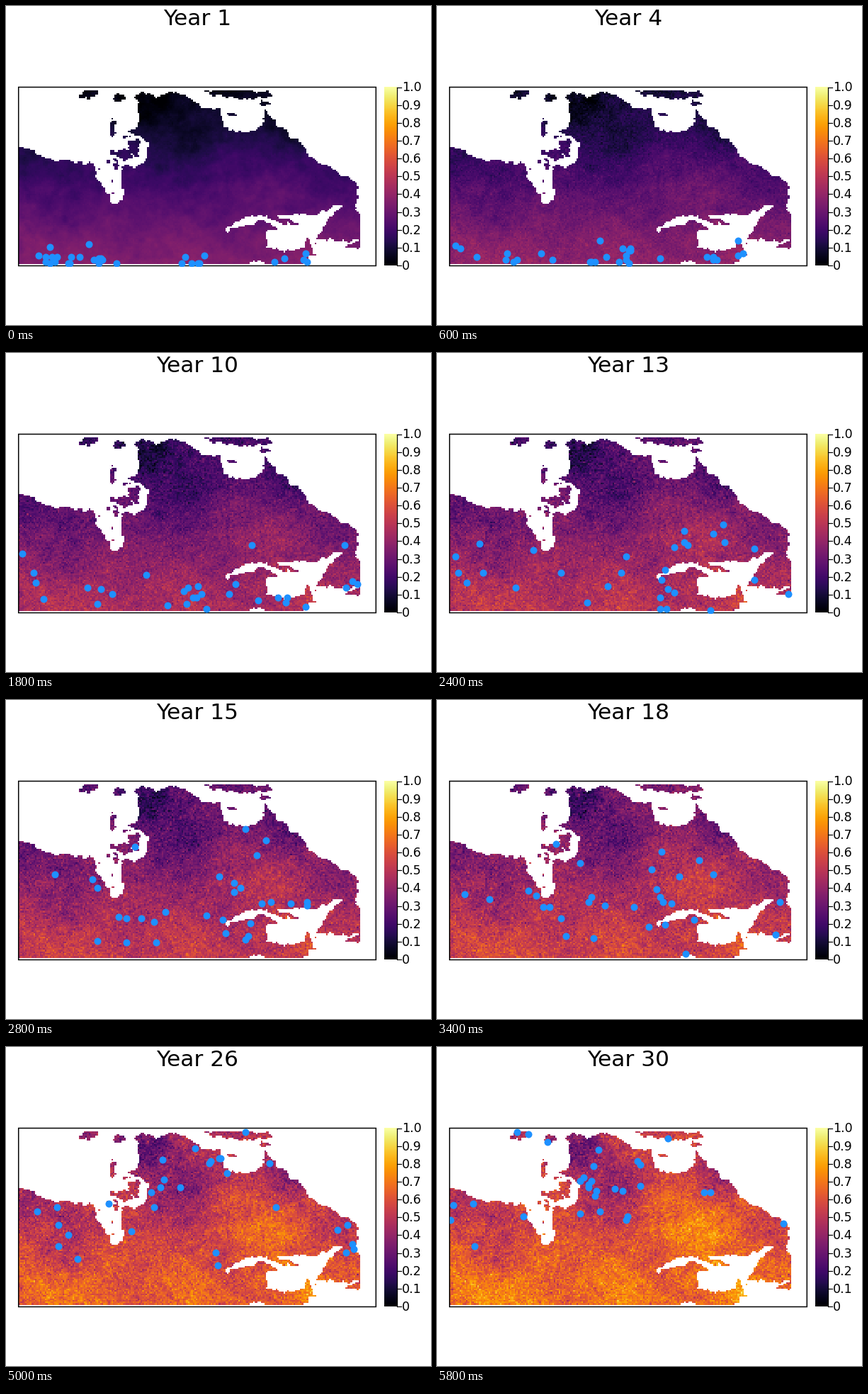
Recreate the animation shown at these times as a matplotlib script. Size 600 by 450 pixels, loop 6 s.

```python
import numpy as np
import matplotlib.pyplot as plt
from matplotlib.animation import FuncAnimation
from matplotlib.patches import Rectangle
from matplotlib.path import Path

W, H, DPI = 600, 450, 100
PX = 72 / DPI
LEFT, RIGHT, TOP, BOTTOM = 17.7, 522.3, 114.5, 366.5
COLS, ROWS, YEARS = 220, 110, 30

plt.rcParams["font.family"] = "DejaVu Sans"

rng = np.random.default_rng(5)
gx, gy = np.meshgrid(LEFT + (np.arange(COLS) + .5) * (RIGHT - LEFT) / COLS,
                     TOP + (np.arange(ROWS) + .5) * (BOTTOM - TOP) / ROWS)


def smooth_noise(sigma):
    """Seeded noise blurred over sigma cells, with unit deviation."""
    fy, fx = np.fft.fftfreq(ROWS)[:, None], np.fft.fftfreq(COLS)
    low = np.exp(-2 * (np.pi * sigma) ** 2 * (fx ** 2 + fy ** 2))
    n = np.fft.ifft2(np.fft.fft2(rng.normal(size=gx.shape)) * low).real
    return n / n.std()


# ---- land: a few key shapes with roughened coasts ----
rx, ry = gx + 1.3 * smooth_noise(1), gy + 1.3 * smooth_noise(1)


def poly(points):
    cells = np.column_stack([rx.ravel(), ry.ravel()])
    return Path(points).contains_points(cells).reshape(gx.shape)


def oval(x, y, a, b, slope=0):
    return ((rx - x) / a) ** 2 + ((ry - y - slope * (rx - x)) / b) ** 2 < 1


coast = [
    (10, 199), (30, 202), (52, 213), (80, 219), (123, 224), (127, 240),
    (137, 258), (150, 278), (160, 278), (167, 264), (163, 248), (164, 228),
    (172, 178), (188, 168), (184, 150), (187, 138), (181, 130), (190, 123),
    (215, 129), (236, 122), (252, 127), (276, 143), (330, 143), (366, 148),
    (384, 170), (415, 194), (424, 213), (470, 236), (493, 250), (496, 270),
    (493, 288), (505, 300), (505, 342), (481, 342), (482, 336), (497, 335),
    (494, 331), (440, 331), (433, 342), (436, 350), (405, 370), (10, 370),
]
gulf = [
    (303, 321), (318, 310), (345, 296), (395, 296), (440, 293), (476, 278),
    (463, 292), (441, 322), (434, 340), (425, 328), (420, 342), (404, 345),
    (388, 345), (368, 340), (367, 318), (384, 315), (362, 304), (340, 309),
]
bays = [(174, 204, 27, 24), (333, 151, 32, 28), (356, 363, 10, 2)]
isles = [
    (115, 124, 14, 6, -.15), (160, 131, 7, 6), (152, 166, 5, 4),
    (150, 176, 4, 7), (166, 211, 11, 8), (181, 200, 8, 10),
    (325, 124, 46, 6, .06), (368, 124, 8, 3), (364, 138, 8, 3),
    (320, 154, 5, 3), (390, 303, 20, 4, .25),
]

land = poly(coast) & ~poly(gulf)
for bay in bays:
    land &= ~oval(*bay)
for isle in isles:
    land |= oval(*isle)
land |= (smooth_noise(.9) > 1.7) & oval(155, 215, 24, 62) & (gx > 128)
land &= (gy > 118) & (gy < 364.5) & (gx < 500)

# ---- suitability: a south-north gradient plus growing warm and cool spots ----
spots = [  # x, y, radius, strength
    (195, 140, 28, -.26), (250, 205, 38, -.17), (85, 260, 38, -.11),
    (392, 187, 27, -.20), (350, 232, 40, .08), (75, 358, 36, .09),
    (385, 280, 38, .08), (430, 348, 20, .10), (318, 310, 24, -.08),
    (285, 350, 30, .07), (482, 258, 25, -.09), (115, 124, 20, -.15),
    (25, 208, 30, -.10),
]
bumps = sum(k * np.exp(-((gx - x) ** 2 + (gy - y) ** 2) / (2 * r * r))
            for x, y, r, k in spots)
south = (gy - TOP) / (BOTTOM - TOP)
texture = .012 * smooth_noise(3) + .007 * smooth_noise(1)
grain = rng.normal(size=gx.shape)


def climate(year):
    s = (year - 1) / (YEARS - 1)
    start, end = .04 + .32 * south, .55 + .12 * south
    return start + (end - start) * s + bumps * (.25 + .75 * s) + texture * (1 + s)


def field(year):
    fresh = np.random.default_rng(year).normal(size=gx.shape)
    level = .004 + .052 * (1 - np.exp(-(year - 1) / 8))
    value = climate(year) + level * (.8 * grain + .6 * fresh)
    return np.ma.array(np.clip(value, 0, 1), mask=~land)


def sightings(year):
    """Thirty land cells, most likely where the climate is near the ideal."""
    band = .03 + .03 * (year - 1) / (YEARS - 1)
    weight = land * np.exp(-.5 * ((climate(year) - .45) / band) ** 2)
    p = weight.ravel() / weight.sum()
    pick = np.random.default_rng(100 + year).choice(p.size, 30, p=p)
    return np.column_stack([gx.ravel()[pick], gy.ravel()[pick]])


# ---- stage ----
fig = plt.figure(figsize=(W / DPI, H / DPI), dpi=DPI, facecolor="white")
ax = fig.add_axes([0, 0, 1, 1])
ax.axis("off")

heat = ax.imshow(field(1), cmap="inferno", vmin=0, vmax=1, aspect="auto",
                 interpolation="nearest", extent=(LEFT, RIGHT, BOTTOM, TOP))
ax.imshow(np.linspace(1, 0, 256)[:, None], cmap="inferno", aspect="auto",
          interpolation="nearest", extent=(534, 551.5, BOTTOM - .5, TOP))
ax.set_xlim(0, W)
ax.set_ylim(H, 0)

box = (LEFT, TOP), RIGHT - LEFT, BOTTOM - TOP
ax.add_patch(Rectangle(*box, fill=False, ec="black", lw=1.5 * PX, snap=False,
                       zorder=3))
dots = ax.scatter([], [], s=(10 * PX) ** 2, c="dodgerblue", linewidths=0, zorder=4)
dots.set_clip_path(Rectangle(*box, transform=ax.transData))

ax.plot([551.5, 551.5], [TOP, BOTTOM - .5], color="black", lw=1.2 * PX)
for k in range(11):
    y = BOTTOM - .5 - k * (BOTTOM - TOP - .5) / 10
    ax.plot([551.5, 557.5], [y, y], color="black", lw=1.2 * PX)
    ax.text(559, y + 6, f"{k / 10:.1f}" if k else "0", fontsize=17.46 * PX)

title = ax.text((LEFT + RIGHT) / 2 + .5, 26.8, "", fontsize=22.5, ha="center")


def draw(i):
    year = i + 1
    heat.set_data(field(year))
    dots.set_offsets(sightings(year))
    title.set_text(f"Year {year}")
    return heat, dots, title


anim = FuncAnimation(fig, draw, frames=YEARS, interval=200, repeat=True,
                     repeat_delay=0, blit=False)
plt.show()
```
